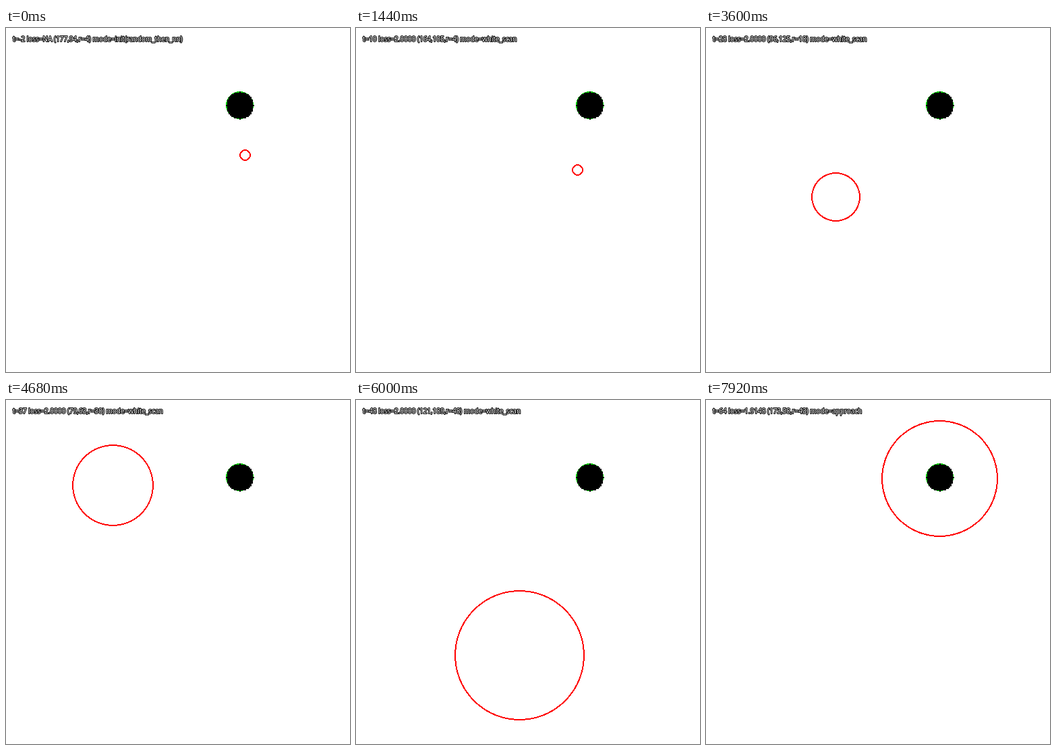
These frames come from a looping animation (510 px wide and 510 px high, 8 s). An HTML page with a canvas:

```html
<!DOCTYPE html>
<html lang="en">
<head>
<meta charset="utf-8">
<title>Circle search</title>
<style>
  html, body { margin: 0; width: 100%; height: 100%; overflow: hidden; background: #fff; }
  canvas { display: block; width: 510px; height: 510px; }
</style>
</head>
<body>
<canvas id="stage" width="510" height="510"></canvas>
<script>
const ctx = document.getElementById('stage').getContext('2d');
const SIZE = 510, LOOP = 8000, STEP = 120, CELL = 2, APPROACH = 52;
const target = { x: 173, y: 57, r: 10 };

// Where the search changes heading: [t, x, y]
const turns = [
  [-2, 177, 94], [2, 205, 171], [5, 251, 172], [6, 231, 188], [10, 164, 105],
  [13, 221, 50], [15, 210, 7], [19, 137, 61], [23, 80, 142], [26, 126, 169],
  [32, 36, 37], [34, 27, 27], [37, 79, 63], [43, 162, 187], [45, 147, 212],
  [48, 121, 189], [54, 162, 38], [56, 171, 49], [59, 176, 60], [64, 173, 58]
];

function probeAt(t) {
  const i = Math.max(1, turns.findIndex(turn => turn[0] >= t));
  const [t0, x0, y0] = turns[i - 1], [t1, x1, y1] = turns[i];
  const p = (t - t0) / (t1 - t0);
  return {
    x: Math.round(x0 + (x1 - x0) * p),
    y: Math.round(y0 + (y1 - y0) * p),
    r: radiusAt(t)
  };
}

// Grows quadratically while scanning, then shrinks by one per step.
function radiusAt(t) {
  const grown = 2 + (4 + 0.139 * (t - 28)) ** 2;
  return t < 0 ? 4 : Math.min(Math.max(4, Math.round(grown)), 107 - t);
}

function lossAt(t, r) {
  if (t < 0) return 'NA';
  if (t < APPROACH) return '2.0000';
  const inside = 80.75, outside = r * r - 34;
  return (2 - 2 * inside / (inside + outside)).toFixed(4);
}

function modeAt(t) {
  return t < 0 ? 'init(random_then_nn)' : t < APPROACH ? 'white_scan' : 'approach';
}

const halfChord = (r, dy) => Math.floor(Math.sqrt(Math.max(0, r * r - dy * dy)));

// Hard-edged ring, two pixels wide, drawn row by row.
function ring({ x, y, r }, color) {
  const cx = x * CELL, cy = y * CELL, outer = r * CELL + 0.4, inner = outer - 2;
  ctx.fillStyle = color;
  for (let dy = -r * CELL; dy <= r * CELL; dy++) {
    const far = halfChord(outer, dy);
    const near = Math.abs(dy) < inner ? halfChord(inner, dy) : -1;
    ctx.fillRect(cx - far, cy + dy, far - near, 1);
    ctx.fillRect(cx + near + 1, cy + dy, far - near, 1);
  }
}

function disc({ x, y, r }, color) {
  ctx.fillStyle = color;
  for (let dy = -r; dy <= r; dy++) {
    const half = halfChord(r, dy);
    ctx.fillRect((x - half) * CELL, (y + dy) * CELL, (2 * half + 1) * CELL, CELL);
  }
}

function label(text) {
  ctx.font = '10px "Open Sans", sans-serif';
  ctx.lineJoin = 'round';
  ctx.lineWidth = 2;
  ctx.strokeStyle = '#000';
  ctx.strokeText(text, 10, 20);
  ctx.fillStyle = '#fff';
  ctx.fillText(text, 10, 20);
}

function draw(time) {
  const t = Math.floor(time % LOOP / STEP) - 2;
  const probe = probeAt(t), { x, y, r } = probe;
  ctx.fillStyle = '#fff';
  ctx.fillRect(0, 0, SIZE, SIZE);
  ring(target, '#00c800');
  disc(target, '#000');
  ring(probe, '#f00');
  label(`t=${t} loss=${lossAt(t, r)} (${x},${y},r=${r}) mode=${modeAt(t)}`);
}

const start = performance.now();
function tick() {
  draw(performance.now() - start);
  requestAnimationFrame(tick);
}
tick();
</script>
</body>
</html>
```
